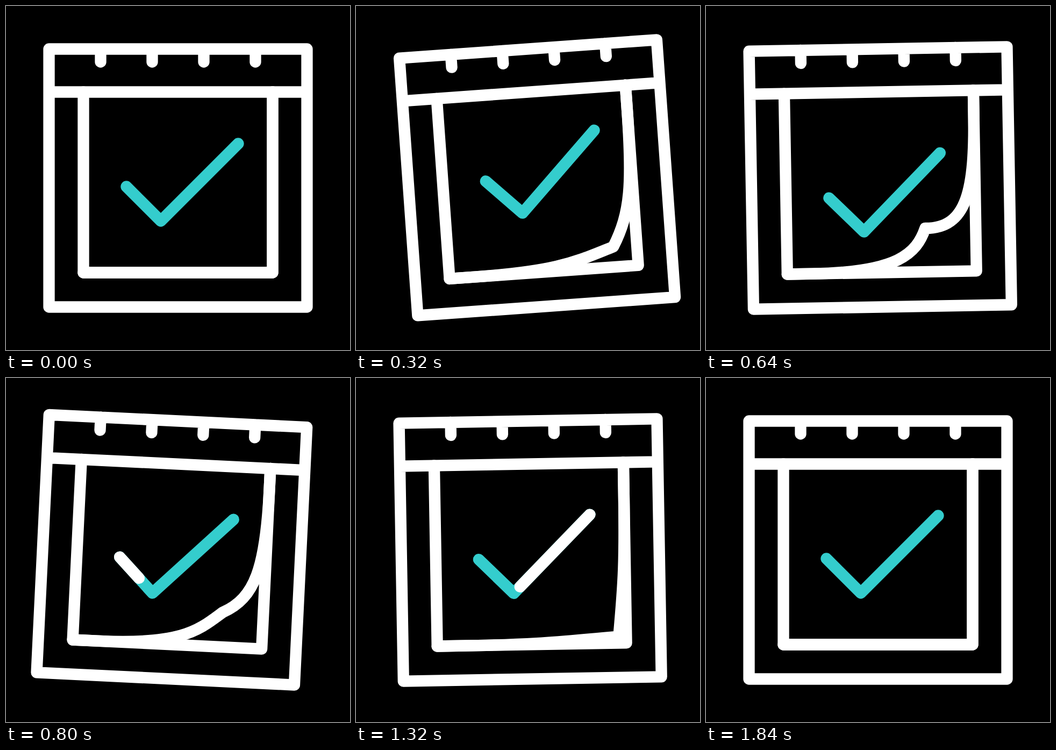
Recreate the animation shown at these times as an HTML page. Size 640 by 640 pixels, loop 2000 ms.

```html
<!DOCTYPE html>
<html lang="en">
<head>
<meta charset="utf-8">
<title>Calendar check</title>
<style>
  html, body { margin: 0; width: 100%; height: 100%; overflow: hidden; background: #000; }
  svg { display: block; width: 100vw; height: 100vh; }
  path { fill: none; stroke: #fff; stroke-width: 21.33; stroke-linecap: round; stroke-linejoin: round; }
  #tick { stroke: #34cdcd; }
</style>
</head>
<body>
<svg viewBox="0 0 640 640">
  <g id="board">
    <path d="M80 80H560V560H80ZM80 160H560M176 80V104M272 80V104M368 80V104M464 80V104"/>
    <path d="M144 160V496H496V160"/>
    <path id="fold"/>
    <g id="mark">
      <path id="tick" d="M224 336L288 400L432 256"/>
      <path id="sweep" d="M224 336L288 400L432 256"/>
    </g>
  </g>
</svg>
<script>
const LOOP = 2000, STEP = 40, END = 1840;
const [board, fold, mark, sweep] =
  ['board', 'fold', 'mark', 'sweep'].map(id => document.getElementById(id));
const length = sweep.getTotalLength();

const linear = x => x;
const smooth = x => x * x * (3 - 2 * x);
const mix = (a, b, k) => a + (b - a) * k;

// Value at time t on a track of [time, value] keys
function track(t, keys, ease = smooth) {
  if (t <= keys[0][0]) return keys[0][1];
  for (let i = 1; i < keys.length; i++) {
    const [t0, a] = keys[i - 1], [t1, b] = keys[i];
    if (t <= t1) return mix(a, b, ease((t - t0) / (t1 - t0)));
  }
  return keys[keys.length - 1][1];
}

// Page corner lifts by `lift`; `bend` turns the edges in towards it
function foldPath(lift, bend) {
  const x = mix(496, 402, lift), y = mix(496, 415, lift);
  const rx = x + 78 * bend, ry = y + mix(-116, 2, bend);
  const bx = x + mix(-116, -17, bend), by = y + 47 * bend;
  return `M496 160V200C496 345 ${rx} ${ry} ${x} ${y}C${bx} ${by} 350 496 190 496H144`;
}

function draw(t) {
  const angle = track(t, [[0, 0], [440, -5], [840, 3], [1280, -1], [END, 0]]);
  const shift = track(t, [[0, 0], [440, -20], [640, 19.5], [840, 0]]);
  const lift = track(t, [[40, 0], [640, 1], [1440, 0]], linear);
  const bend = track(t, [[40, 0], [640, 1], [800, .74], [1440, 0]], linear);
  const from = track(t, [[960, 0], [END, 1]]);
  const to = track(t, [[640, 0], [1230, 1]]);

  board.setAttribute('transform', `rotate(${angle} 320 80)`);
  mark.setAttribute('transform', `translate(0 ${shift})`);
  fold.setAttribute('d', foldPath(lift, bend));
  sweep.style.display = to > from ? '' : 'none';
  sweep.style.strokeDasharray = `${(to - from) * length} ${2 * length}`;
  sweep.style.strokeDashoffset = -from * length;
}

const start = performance.now();
function tick() {
  const t = (performance.now() - start) % LOOP;
  draw(Math.min(Math.floor(t / STEP) * STEP, END));
  requestAnimationFrame(tick);
}
tick();
</script>
</body>
</html>
```
